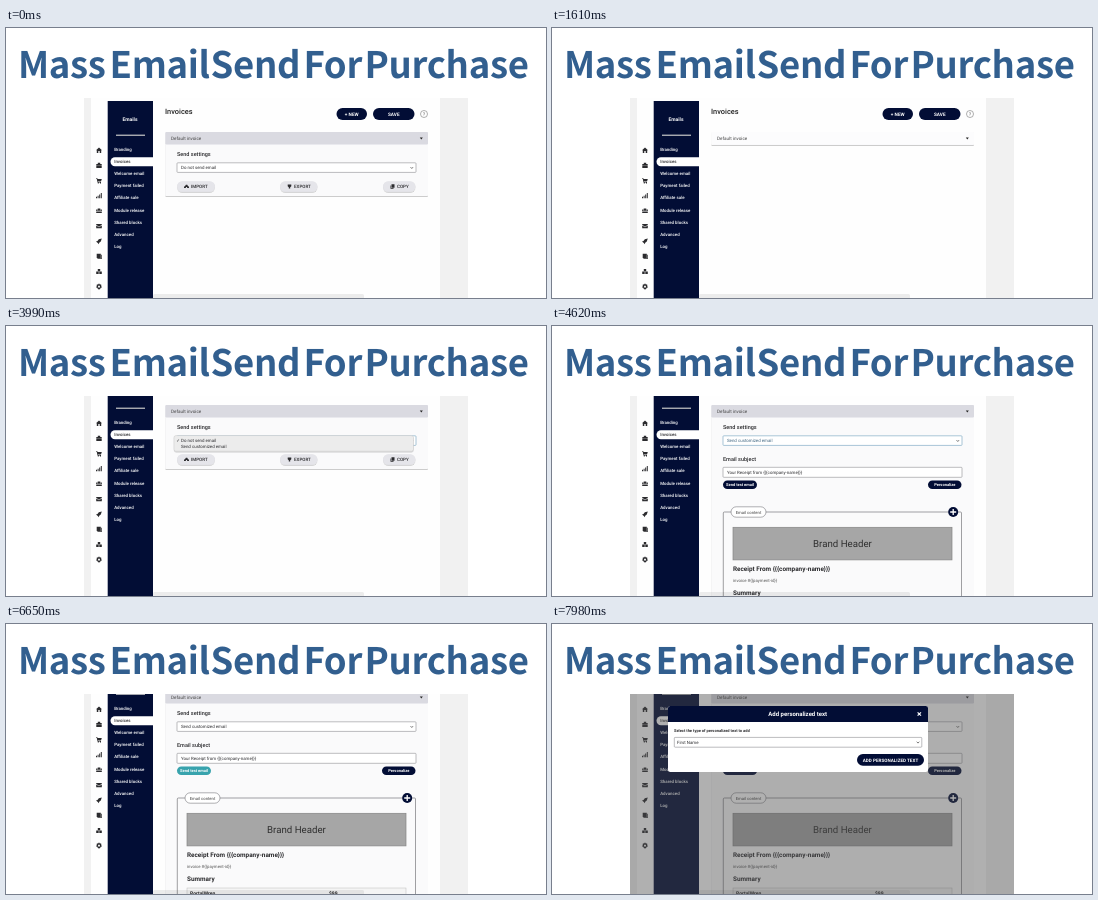
Recreate the animation shown at these times as an HTML page. Size 540 by 270 pixels, loop 8000 ms.

```html
<!DOCTYPE html>
<html lang="en">
<head>
<meta charset="utf-8">
<title>Mass Email Send For Purchase</title>
<style>
  html, body { margin: 0; width: 100%; height: 100%; overflow: hidden; background: #fff; }
  svg { display: block; }
  #stage { width: 100vw; height: 100vh; }
  text { font-family: Roboto, sans-serif; text-rendering: geometricPrecision; white-space: pre; }
  #title text { font-family: "Noto Sans CJK JP", "Noto Sans CJK SC", "Noto Sans CJK", Roboto, sans-serif; letter-spacing: -.3px; }
</style>
</head>
<body>
<svg id="stage" viewBox="0 0 540 270"></svg>
<script>
const NAVY = '#020d35', TEAL = '#38a3ad', INK = '#2b2b2e';
const LOOP = 8000;

// Markup helpers
const rect = (x, y, w, h, fill, r = 0, extra = '') =>
  `<rect x="${x}" y="${y}" width="${w}" height="${h}" rx="${r}" fill="${fill}" ${extra}/>`;
const text = (x, y, str, size = 4.4, fill = INK, weight = 400, extra = '') =>
  `<text x="${x}" y="${y}" font-size="${size}" fill="${fill}" font-weight="${weight}" ${extra}>${str}</text>`;
const centered = (x, y, str, size, fill, weight) =>
  text(x, y, str, size, fill, weight, 'text-anchor="middle"');
const path = (d, fill, extra = '') => `<path d="${d}" fill="${fill}" ${extra}/>`;
const line = (d, color, width = 0.7) => path(d, 'none', `stroke="${color}" stroke-width="${width}"`);
const group = (id, content, extra = '') => `<g id="${id}" ${extra}>${content}</g>`;
const shadow = 'filter="url(#shadow)"';

const pill = (x, y, w, h, label, size, id = '') =>
  rect(x, y, w, h, NAVY, h / 2, id && `id="${id}"`) +
  centered(x + w / 2, y + h / 2 + size * 0.36, label, size, '#fff', 700);

const field = (x, y, w, h, id = '') =>
  rect(x, y, w, h, '#fff', 0.8, `stroke="#8d8d93" stroke-width=".6" ${id && `id="${id}"`}`);
const chevron = (x, y) => line(`M${x - 1.3} ${y - .7}l1.3 1.4 1.3-1.4`, '#444');

const softButton = (x, w, label, icon) =>
  rect(x, 153.3, w, 10.5, '#e5e5ea', 5.2, shadow) +
  `<g transform="translate(${x + 9.5} 158.5)">${path(icon, INK)}</g>` +
  text(x + 14, 160.2, label, 4.5, INK, 500);

// Icons are drawn around their own centre
const ICONS = [
  'M-3 0L0-2.8 3 0H2.2V2.6H.7V.6H-.7V2.6H-2.2V0Z',
  'M-2.7-1.5H-1.2V-2.7H1.2V-1.5H2.7V.2H-2.7ZM-2.7.6H2.7V2.5H-2.7Z',
  'M-3-2.5H-1.8L-1.5-1.7H2.8L2 .8H-1.2L-1 1.3H2V1.8H-1.5L-2.3-2H-3ZM-1.2 2H-.2V3H-1.2ZM1 2H2V3H1Z',
  'M-3 1H-2V2.6H-3ZM-1.4 0H-.4V2.6H-1.4ZM.2-1.2H1.2V2.6H.2ZM1.8-2.8H2.8V2.6H1.8Z',
  'M-1.3-2.3H1.3V-.2H-1.3ZM-2.8-1.3H-1.6V.2H-2.8ZM1.6-1.3H2.8V.2H1.6ZM-2.8.5H2.8V2.2H-2.8Z',
  'M-2.8-2H2.8V-1.2L0 .6-2.8-1.2ZM-2.8-.5L0 1.3 2.8-.5V2.2H-2.8Z',
  'M2.8-2.8L1.8.2.2 1.6-.2 3-1.2 1.8-1.8 1.2-3 .4-1.5-.2-.2-1.9Z',
  'M-2.3-2.7H1.8V1.6H-2.3ZM2.1-1.5H2.8V2.7H-1.6V2H2.1Z',
  'M-1.2-2.6H1.2V-.3H-1.2ZM-2.8 .1H-.3V2.5H-2.8ZM.3.1H2.8V2.5H.3Z',
  'M-.6-2.8H.6L.9-1.9 1.9-2.3 2.5-1.4 1.9-.6 2.8 0 2.5 1.2 1.6 1.2 1.2 2.3 0 2.8-1.2 2.3-1.6 1.2-2.5 1.2-2.8 0-1.9-.6-2.5-1.4-1.9-2.3-.9-1.9ZM-.9-.9V.9H.9V-.9Z'
];
const CLOUD = 'M-2.5 1.6V.2L-1.4-.6-.6-1.8H.8L1.4-.5 2.5.3V1.6H.6V.4H-.6V1.6Z';
const FUNNEL = 'M-1.8-2H1.8V-.2L.7.7V2H-.7V.7L-1.8-.2Z';
const SHEETS = 'M-1-2.2H2V1.2H-1ZM-2-.9H-1.4V1.6H1V2.3H-2Z';
const MENU = ['Branding', 'Invoices', 'Welcome email', 'Payment failed', 'Affiliate sale',
  'Module release', 'Shared blocks', 'Advanced', 'Log'];

const sidebar =
  rect(101.7, 73, 45.3, 240, NAVY) +
  ICONS.map((d, i) => `<g transform="translate(93 ${122.3 + i * 15.15})">${path(d, INK, 'fill-rule="evenodd"')}</g>`).join('') +
  centered(124, 93.2, 'Emails', 5, '#fff', 700) +
  line('M110 107.2H139', '#efeee6', 1) +
  path('M147 129.2H109a4.5 4.5 0 0 0 0 9H147Z', '#fff') +
  MENU.map((label, i) => text(108.2, 123.2 + i * 12.07, label, 4.4, i === 1 ? INK : '#fff', 500)).join('');

const header =
  text(159, 86.1, 'Invoices', 7.4, '#222', 500) +
  pill(330.5, 80, 30.5, 12, '+ NEW', 4.7) +
  pill(367, 80, 41.5, 12, 'SAVE', 4.7) +
  `<circle cx="418" cy="86" r="3.5" fill="#fff" stroke="#777" stroke-width=".6"/>` +
  centered(418, 87.8, '?', 5, '#666', 400);

const plainBody =
  softButton(171, 38, 'IMPORT', CLOUD) +
  softButton(274, 37.5, 'EXPORT', FUNNEL) +
  softButton(377, 32.5, 'COPY', SHEETS);

const emailBody =
  text(171, 160, 'Email subject', 5.5, INK, 500) +
  field(171, 166.3, 239, 10) +
  text(175, 172.9, 'Your Receipt from {{{company-name}}}') +
  pill(171, 179.5, 34, 8.6, 'Send test email', 4, 'testButton') +
  pill(376, 179.5, 33.5, 8.6, 'Personalize', 4, 'personalButton') +
  rect(171.3, 211, 238.2, 200, 'none', 1, 'stroke="#77777c" stroke-width=".7"') +
  rect(179, 205.8, 35, 10.4, '#fff', 5.2, 'stroke="#77777c" stroke-width=".6"') +
  centered(196.5, 212.5, 'Email content', 4.2, '#444') +
  `<circle cx="401.2" cy="211" r="5" fill="${NAVY}"/>` +
  line('M398.2 211h6M401.2 208v6', '#fff', 1.3) +
  rect(181, 226.3, 219, 32.6, '#a6a6a6', 0, 'stroke="#858585" stroke-width=".7"') +
  centered(290.5, 246.2, 'Brand Header', 9.7, '#303030') +
  text(181, 270.3, 'Receipt From {{{company-name}}}', 6.4, INK, 700) +
  text(181, 281, 'invoice #{{payment-id}}', 4.3, '#555') +
  text(181, 293.7, 'Summary', 6.4, INK, 700) +
  rect(181, 301, 219, 20, '#f4f4f4', 0, 'stroke="#bbb" stroke-width=".5"') +
  text(184, 307.6, 'PortalWren', 5, INK, 700) +
  text(323, 307.6, '$99', 5, INK, 700);

const card =
  rect(159.3, 104, 262.7, 13, '#fafafb', 1, `id="cardBack" ${shadow}`) +
  `<svg id="cardBody" x="159" y="117" width="263" height="51" viewBox="159 117 263 51" preserveAspectRatio="xMinYMin slice" overflow="hidden">` +
    text(171, 128.2, 'Send settings', 5.5, INK, 500) +
    field(171, 134.8, 239, 9.6, 'sendField') +
    text(175, 141.2, '', 4.4, INK, 400, 'id="sendValue"') +
    chevron(405.8, 139.8) +
    group('plainBody', plainBody) + group('emailBody', emailBody) +
  '</svg>' +
  rect(159.3, 104, 262.7, 12.6, '#dadae1', 1, 'id="cardHead"') +
  text(165, 112, 'Default invoice', 4.6, '#444') +
  path('M413.8 109.6h3l-1.5 2Z', '#222');

const dropdown =
  rect(168, 134.6, 239.5, 15.6, '#ececec', 2, shadow + ' stroke="#c4c4c4" stroke-width=".4"') +
  text(170.2, 141, '✓') +
  text(175, 141, 'Do not send email') +
  text(175, 147.2, 'Send customized email');

const modal =
  rect(116, 82, 260, 66, '#fff', 2.5) +
  path('M116 98V84.5a2.5 2.5 0 0 1 2.5-2.5h255a2.5 2.5 0 0 1 2.5 2.5V98Z', NAVY) +
  centered(245.7, 92.2, 'Add personalized text', 6, '#fff', 700) +
  line('M365.6 88.3l3.4 3.4m0-3.4l-3.4 3.4', '#fff', 1.2) +
  text(122, 108.2, 'Select the type of personalized text to add', 4, INK, 700) +
  field(122.3, 113.4, 247.5, 9.8) +
  text(125, 119.9, 'First Name') +
  chevron(366, 118.4) +
  pill(305, 130, 67, 11.8, 'ADD PERSONALIZED TEXT', 4.6);

const TITLE = [['Mass', 12], ['Email', 103.5], ['Send', 204.5], ['For', 297.5], ['Purchase', 358.5]];

stage.innerHTML = `
  <defs>
    <filter id="shadow" x="-10%" y="-30%" width="120%" height="180%">
      <feDropShadow dx="0" dy=".7" stdDeviation=".7" flood-opacity=".28"/>
    </filter>
    <clipPath id="screen">${rect(78, 70, 384, 200, '#000')}</clipPath>
  </defs>` +
  group('title', TITLE.map(([word, x]) => text(x, 50, word, 36.5, '#325f8f', 600)).join('')) +
  `<g clip-path="url(#screen)">` +
    rect(78, 70, 384, 200, '#f1f1f1') +
    rect(85, 70, 349, 200, '#fefefe') +
    group('page', sidebar + header + card + group('dropdown', dropdown)) +
    rect(147, 266, 211, 6, 'rgba(0,0,0,.07)', 1.5) +
    group('overlay', rect(78, 70, 384, 200, 'rgba(76,76,76,.44)')) +
    group('modal', modal) +
  '</g>';

const el = id => document.getElementById(id);
const set = (id, attrs) => {
  for (const name in attrs) el(id).setAttribute(name, attrs[name]);
};
const show = (id, on) => set(id, { display: on ? 'inline' : 'none' });
const ease = (t, start, end) => {
  const p = Math.min(1, Math.max(0, (t - start) / (end - start)));
  return p * p * (3 - 2 * p);
};
const during = (t, start, end) => t >= start && t < end;

function draw(t) {
  const customized = t >= 4270;
  const opened = 1 - ease(t, 350, 700) + ease(t, 1800, 2150);
  const height = 51 * opened + 250 * ease(t, 4270, 4480);
  const scroll = 25 * ease(t, 2250, 2700) + 12 * ease(t, 5250, 5650);
  const focused = during(t, 2800, 5300);

  set('page', { transform: `translate(0 ${-scroll})` });
  set('cardBack', { height: 13 + height });
  set('cardBody', { height, viewBox: `159 117 263 ${height}` });
  set('cardHead', { fill: opened > 0.02 ? '#dadae1' : '#fcfcfd' });
  set('sendField', { stroke: focused ? '#6f9fbc' : '#8d8d93' });
  set('sendValue', { fill: focused ? '#3f6580' : INK });
  el('sendValue').textContent = customized ? 'Send customized email' : 'Do not send email';
  show('plainBody', !customized);
  show('emailBody', customized);
  show('dropdown', during(t, 3430, 4270));
  set('testButton', { fill: during(t, 6200, 6950) ? TEAL : NAVY });
  set('personalButton', { fill: during(t, 7200, 7660) ? TEAL : NAVY });
  set('overlay', { opacity: ease(t, 7660, 7900) });
  set('modal', { opacity: ease(t, 7660, 7900) });
}

function tick() {
  draw(performance.now() % LOOP);
  requestAnimationFrame(tick);
}
tick();
</script>
</body>
</html>
```
